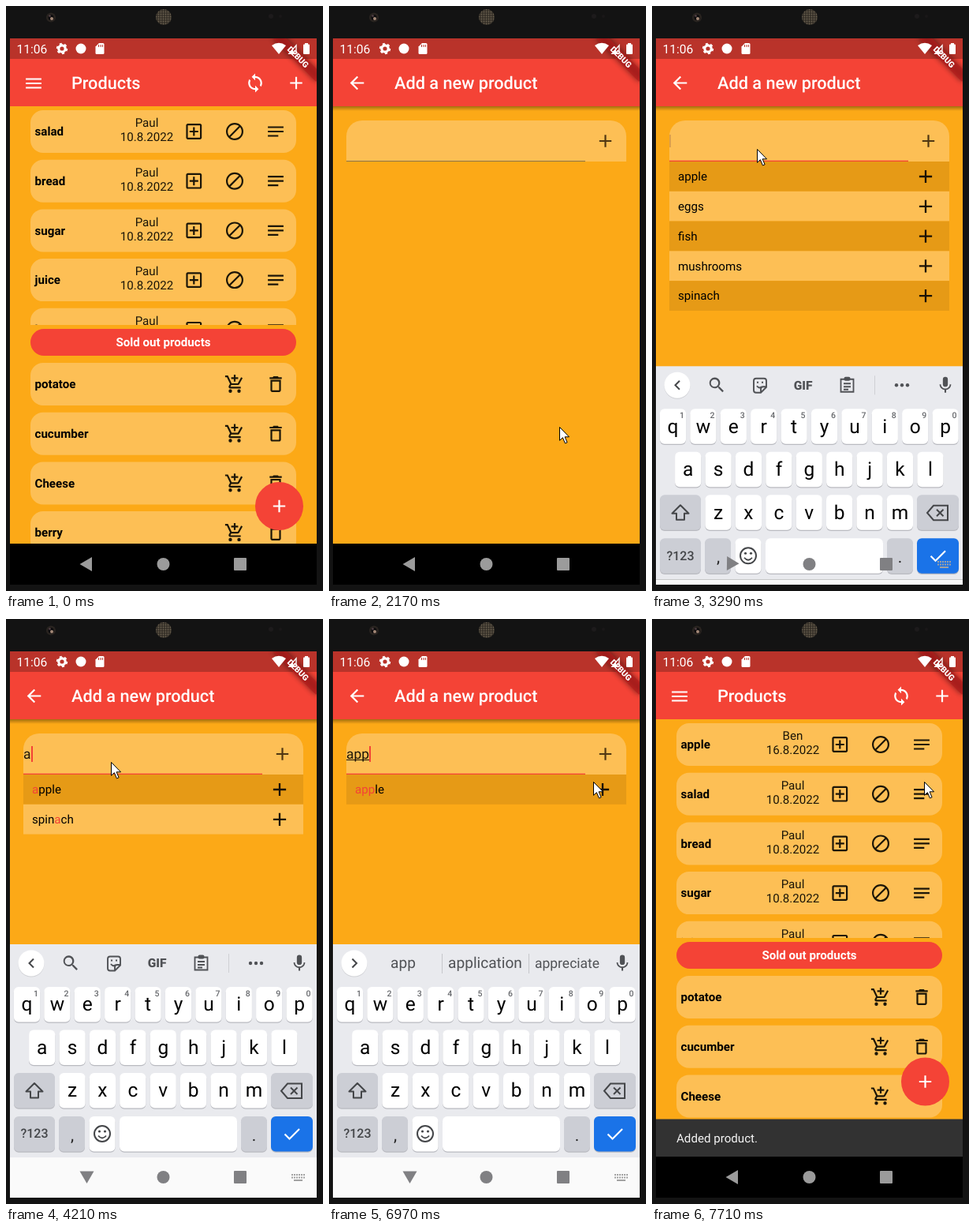
These frames come from a looping animation (402 px wide and 741 px high, 8000 ms). An HTML page:

```html
<!DOCTYPE html>
<html lang="en">
<head>
<meta charset="utf-8">
<title>Shopping list demo</title>
<style>
  html, body { margin: 0; width: 100%; height: 100%; overflow: hidden; background: #131313; }
  svg { display: block; width: 100vw; height: 100vh; }
  text { font-family: Roboto, "Liberation Sans", sans-serif; text-rendering: geometricPrecision; white-space: pre; }
</style>
</head>
<body>
<svg id="stage" viewBox="0 0 402 741"></svg>
<script>
const RED = '#f44336', ORANGE = '#fca917', CARD = '#fdbf55', INK = '#1c1608';
const LOOP = 8000, PITCH = 62.7, KBD = 321;

const ICONS = {
  add: 'M19 13h-6v6h-2v-6H5v-2h6V5h2v6h6v2z',
  menu: 'M3 18h18v-2H3zm0-5h18v-2H3zm0-7v2h18V6z',
  back: 'M20 11H7.83l5.59-5.59L12 4l-8 8 8 8 1.41-1.41L7.83 13H20z',
  sync: 'M12 4V1L8 5l4 4V6c3.31 0 6 2.69 6 6 0 1.01-.25 1.97-.7 2.8l1.46 1.46C19.54 15.03 20 13.57 20 12c0-4.42-3.58-8-8-8zm0 14c-3.31 0-6-2.69-6-6 0-1.01.25-1.97.7-2.8L5.24 7.74C4.46 8.97 4 10.43 4 12c0 4.42 3.58 8 8 8v3l4-4-4-4z',
  box: 'M19 3H5c-1.1 0-2 .9-2 2v14c0 1.1.9 2 2 2h14c1.1 0 2-.9 2-2V5c0-1.1-.9-2-2-2zm0 16H5V5h14zm-8-2h2v-4h4v-2h-4V7h-2v4H7v2h4z',
  block: 'M12 2a10 10 0 1 0 0 20 10 10 0 0 0 0-20zM4 12c0-4.42 3.58-8 8-8 1.85 0 3.55.63 4.9 1.69L5.69 16.9C4.63 15.55 4 13.85 4 12zm8 8c-1.85 0-3.55-.63-4.9-1.69L18.31 7.1C19.37 8.45 20 10.15 20 12c0 4.42-3.58 8-8 8z',
  notes: 'M3 18h12v-2H3zM3 6v2h18V6zm0 7h18v-2H3z',
  cart: 'M11 9h2V6h3V4h-3V1h-2v3H8v2h3zm-4 9a2 2 0 1 0 0 4 2 2 0 0 0 0-4zm10 0a2 2 0 1 0 0 4 2 2 0 0 0 0-4zm-9.83-3.25l.03-.12.9-1.63h7.45c.75 0 1.41-.41 1.75-1.03l3.86-7.01L19.42 4h-.01l-3.86 7H8.53L4.27 2H1v2h2l3.6 7.59-1.35 2.45C4.52 15.37 5.48 17 7 17h12v-2H7.42c-.13 0-.25-.11-.25-.25z',
  trash: 'M6 19c0 1.1.9 2 2 2h8c1.1 0 2-.9 2-2V7H6zM8 9h8v10H8zm7.5-5l-1-1h-5l-1 1H5v2h14V4z',
  search: 'M15.5 14h-.79l-.28-.27A6.5 6.5 0 1 0 13.7 14.4l.3.3v.8l5 5 1.5-1.5zm-6 0a4.5 4.5 0 1 1 0-9 4.5 4.5 0 0 1 0 9z',
  mic: 'M12 14a3 3 0 0 0 3-3V5a3 3 0 0 0-6 0v6a3 3 0 0 0 3 3zm5.3-3c0 3-2.54 5.1-5.3 5.1S6.7 14 6.7 11H5c0 3.41 2.72 6.23 6 6.72V21h2v-3.28c3.28-.48 6-3.3 6-6.72z'
};

const icon = (name, x, y, fill = INK, k = 1.1) =>
  `<path d="${ICONS[name]}" fill="${fill}" transform="translate(${x} ${y}) scale(${k}) translate(-12 -12)"/>`;
const rect = (x, y, w, h, fill, r = 0, more = '') =>
  `<rect x="${x}" y="${y}" width="${w}" height="${h}" rx="${r}" fill="${fill}" ${more}/>`;
const circle = (x, y, r, fill, more = '') => `<circle cx="${x}" cy="${y}" r="${r}" fill="${fill}" ${more}/>`;
const line = (d, color, w = 2, more = '') => `<path d="${d}" fill="none" stroke="${color}" stroke-width="${w}" ${more}/>`;
// cy is the middle of the text line
const label = (s, x, cy, { size = 15.14, fill = '#000', weight = 400, at = 'start' } = {}) =>
  `<text x="${x}" y="${cy + size * 0.34}" font-size="${size}" font-weight="${weight}" fill="${fill}" text-anchor="${at}">${s}</text>`;
const group = (id, body, more = '') => `<g id="${id}" ${more}>${body}</g>`;
const clip = (id, x, y, w, h) => `<clipPath id="${id}">${rect(x, y, w, h, '#000')}</clipPath>`;

const bar = title =>
  rect(5, 41, 389, 640, ORANGE) + rect(5, 41, 389, 27, '#b9332a') + rect(5, 67, 389, 60, RED) +
  label(title, 83, 98, { size: 21.7, weight: 500, fill: '#fff' });

const card = (name, y) => rect(31, y, 337, 54, CARD, 16) + label(name, 36.5, y + 27, { weight: 700 });

function stockCard(name, i, who = 'Paul', date = '10.8.2022') {
  const y = 132 + PITCH * i, c = y + 27, mid = { at: 'middle', fill: INK };
  return card(name, y) + label(who, 178.5, c - 11, mid) + label(date, 178.5, c + 7, mid) +
    icon('box', 238.3, c) + icon('block', 290, c) + icon('notes', 342, c);
}

function soldCard(name, i) {
  const y = 452 + PITCH * i;
  return card(name, y) + icon('cart', 290, y + 27) + icon('trash', 342, y + 27);
}

function home() {
  const stock = stockCard('apple', -1, 'Ben', '16.8.2022') +
    ['salad', 'bread', 'sugar', 'juice', 'lemon'].map((n, i) => stockCard(n, i)).join('');
  return bar('Products') + icon('menu', 35, 98, '#fff') + icon('sync', 316, 97.5, '#fff') + icon('add', 368, 97.5, '#fff') +
    `<g clip-path="url(#listClip)">${group('list', stock)}</g>` +
    rect(31, 409, 337, 34, RED, 17) +
    label('Sold out products', 199.5, 426, { weight: 700, fill: '#fff', at: 'middle' }) +
    ['potatoe', 'cucumber', 'Cheese', 'berry'].map(soldCard).join('') +
    group('snack', rect(5, 633.5, 389, 48, '#323232') + label('Added product.', 31, 657.5, { fill: '#f5f5f5' })) +
    group('fab', circle(346.5, 636, 30.5, '#000', 'id="fabShade" filter="url(#blur)"') +
      circle(346.5, 633.5, 30.5, RED, 'id="fabDisc"') + icon('add', 346.5, 633.5, '#fff'));
}

function addPage() {
  return bar('Add a new product') + icon('back', 35.5, 97.5, '#fff') +
    rect(5, 127, 389, 6, 'url(#shade)') +
    `<path d="M22 197V165a20 20 0 0 1 20-20H357a20 20 0 0 1 20 20V197z" fill="${CARD}"/>` +
    icon('add', 350.5, 171, '#4f3612') +
    rect(22, 196, 303, 1, '#8a744a', 0, 'id="rule"') +
    group('typed', '') + rect(22, 161, 2, 20, RED, 0, 'id="caret"') + group('hints', '');
}

function hintRows(words, part) {
  return words.map((w, i) => {
    const y = 197 + 37.8 * i, at = part ? w.indexOf(part) : 0;
    const s = w.slice(0, at) + `<tspan fill="${RED}">${part}</tspan>` + w.slice(at + part.length);
    return rect(22, y, 355, 37.8, i % 2 ? CARD : '#e69a16') + label(s, 33, y + 19) + icon('add', 347, y + 19, '#1b1206', 1.16);
  }).join('');
}

function keyboard() {
  const GREY = '#ccced5', DARK = '#444649';
  const key = (x, y, w, fill = '#fff', h = 44.5) => rect(x, y + 1.3, w, h, '#b9bac0', 6) + rect(x, y, w, h, fill, 6);
  const row = (chars, x0, y, nums) => [...chars].map((c, i) => {
    const x = x0 + 38.4 * i;
    return key(x - 16.6, y, 33.2) + label(c, x, y + 22, { size: 24.5, at: 'middle' }) +
      (nums ? label((i + 1) % 10, x + 11.5, y + 8, { size: 10.5, weight: 500, fill: '#66686c', at: 'middle' }) : '');
  }).join('');
  const tools =
    icon('search', 82, 436, '#505256', 1.05) +
    line('M132 427.5h10a3 3 0 0 1 3 3v8l-7 7h-6a3 3 0 0 1-3-3v-12a3 3 0 0 1 3-3zM145 438h-4a3 3 0 0 0-3 3v4M133 437q3 4 6 1M133 432.5h2M139 432.5h2', '#505256', 1.9) +
    label('GIF', 191.5, 436, { size: 15.5, weight: 900, fill: '#505256', at: 'middle' }) +
    line('M239.5 428.5h16v16h-16zM243 434h9M243 438h9M243 441.5h6', '#505256', 1.8) + rect(243.5, 425.5, 8, 5, '#505256', 2) +
    rect(282, 424, 1, 24, '#cfd0d4') +
    [310, 317, 324].map(x => circle(x, 436, 2.2, '#505256')).join('') +
    line('M35 430.5l-5.5 5.5 5.5 5.5', DARK);
  const word = (s, x, size) => label(s, x, 436, { size, fill: '#505256', at: 'middle' });
  const words = word('app', 94, 19.1) + word('application', 198, 19.1) + word('appreciate', 302, 17.5) +
    rect(143, 424, 1, 25, '#c6c7cb') + rect(253, 424, 1, 25, '#c6c7cb') + line('M29.5 430.5l5.5 5.5-5.5 5.5', DARK);
  return rect(5, 412, 389, 270, '#e9eaee') + rect(5, 682, 389, 51, '#fafafa') +
    circle(32, 437, 16.5, '#cfd0d4') + circle(32, 436, 16.5, '#fff') +
    group('tools', tools) + group('words', words) + icon('mic', 372, 436, '#505256', 1.05) +
    row('qwertyuiop', 26.5, 466, true) + row('asdfghjkl', 45.7, 520.5) + row('zxcvbnm', 84, 575) +
    key(10, 575, 52, GREY) + line('M36 588l-10.5 10.5h5.5v8h10v-8h5.5z', DARK, 2, 'stroke-linejoin="round"') +
    key(336, 575, 53, GREY) + line('M357 588.5h18v18.5h-18l-8-9.25zM361 593.5l8.5 8.5M369.5 593.5l-8.5 8.5', DARK) +
    key(10, 630, 52, GREY) + label('?123', 36, 652, { size: 16, weight: 500, fill: DARK, at: 'middle' }) +
    key(67, 630, 33, GREY) + label(',', 84, 654, { size: 21, fill: '#222', at: 'middle' }) +
    key(105.5, 630, 33) + circle(122, 652, 10, 'none', `stroke="${DARK}" stroke-width="2"`) +
    circle(118.5, 649, 1.6, DARK) + circle(125.5, 649, 1.6, DARK) + line('M117 654.5q5 6 10 0', DARK, 1.8) +
    key(144, 630, 149) + key(298, 630, 33, GREY) + label('.', 314.5, 654, { size: 21, fill: '#222', at: 'middle' }) +
    key(336, 630, 53, '#1a73e8') + line('M353.5 652.5l6 6 12.5-12.5', '#fff', 2.2);
}

function statusIcons() {
  const W = '#fff';
  return label('11:06', 13.5, 54.5, { size: 15.6, fill: W }) +
    circle(71, 54, 4.2, 'none', `stroke="${W}" stroke-width="3.2"`) +
    circle(71, 54, 6.2, 'none', `stroke="${W}" stroke-width="2" pathLength="12" stroke-dasharray="1 1"`) +
    circle(95, 54, 6.5, W) +
    `<path d="M118 47h5a1.5 1.5 0 0 1 1.5 1.5v11a1.5 1.5 0 0 1-1.5 1.5h-8a1.5 1.5 0 0 1-1.5-1.5v-8z" fill="${W}"/>` +
    line('M117.5 49v3M120 49v3M122.3 49v3', '#b9332a', 1) +
    `<path d="M346 61l-9-11q9-6.5 18 0z" fill="${W}"/>` +
    line('M359 60.3l9-10.5v10.5z', W, 1.4) + `<path d="M358 61l6-7v7z" fill="${W}"/>` +
    rect(377, 48.5, 8, 12.5, W, 1) + rect(379, 47, 4, 3, W);
}

const banner =
  `<g transform="translate(394 41) rotate(45)">` +
  rect(-38, 27.5, 76, 12, '#000', 0, 'opacity=".5" filter="url(#blur)"') + rect(-38, 27.5, 76, 12, '#b71c1c', 0, 'opacity=".7"') +
  label('DEBUG', 0, 33.5, { size: 10.4, weight: 900, fill: '#fff', at: 'middle' }) + '</g>';

const bezel =
  rect(0, 0, 402, 741, '#131313') +
  circle(57, 14.5, 6, '#292420') + circle(57, 14.5, 3.5, '#0c0b0d') + circle(58, 16, 2, '#a58a78') + circle(55.5, 12.5, 1.3, '#57454a') +
  circle(200, 14, 10, '#332e26') + circle(200, 14, 10, 'url(#mesh)') +
  circle(336, 13, 3, '#1d1b1c') + circle(348, 13, 2, '#1a1819');

const $ = id => document.getElementById(id);
$('stage').innerHTML = `<defs>
  ${clip('screen', 5, 41, 389, 692)}${clip('app', 5, 41, 389, 640)}${clip('listClip', 5, 127, 389, 277)}
  <filter id="blur" x="-30%" y="-60%" width="160%" height="220%"><feGaussianBlur stdDeviation="3.5"/></filter>
  <linearGradient id="shade" x2="0" y2="1"><stop stop-opacity=".35"/><stop offset="1" stop-opacity="0"/></linearGradient>
  <pattern id="mesh" width="3" height="3" patternUnits="userSpaceOnUse">${circle(1.5, 1.5, 0.9, '#6b6151')}</pattern>
  </defs>` + bezel +
  `<g clip-path="url(#screen)">
    <g clip-path="url(#app)">${group('home', home())}${rect(5, 41, 389, 640, '#000', 0, 'id="scrim"')}${group('add', addPage())}${banner}${statusIcons()}</g>
    ${rect(5, 681, 389, 52, '#000')}${group('kbd', keyboard())}
    ${group('nav', '<path id="tri" d="M93.5 707l15.5-9v18z"/><circle cx="199.5" cy="707" r="8"/><rect x="289" y="699" width="16" height="16" rx="1"/>')}
    ${group('switcher', line('M362 704h17M362 707.5h17', '#a2a2a2', 2, 'stroke-dasharray="2 1"') + line('M365 711h11', '#a2a2a2', 2))}
  </g>` +
  group('mouse', '<path d="M.5 .5v16.8l3.9-3.6 3 7.2 2.7-1.1-3-7h5.4z" fill="#fff" stroke="#000" stroke-linejoin="round"/>');

// Moments where a run of screen updates begins; inside a run the picture steps every 70 ms
const RUNS = [0, 990, 1610, 2450, 3290, 4080, 4210, 4410, 4610, 5140, 5340, 6150, 6480, 7300, 7710];
const TRACK = [
  [990, 356, 730], [1410, 352, 635], [2030, 352, 635], [2170, 292, 533], [2450, 205, 345], [2730, 143, 202], [2870, 133, 181],
  [5300, 133, 181], [5750, 115, 210], [6440, 115, 210], [6620, 165, 213], [6830, 285, 211], [6970, 335, 206], [7110, 345, 206]
];
const TYPING = [[4210, 'a', 32], [4410, 'ap', 42], [4610, 'app', 51]];
const BLINKS = [[3080, 3580], [4080, 5140], [5640, 6150], [6650, 7150]];
const WORDS = ['apple', 'eggs', 'fish', 'mushrooms', 'spinach'];

function ramp(t, a, b) {
  const p = (t - a) / (b - a);
  return p < 0 ? 0 : p > 1 ? 1 : p;
}
const out = (p, n = 3) => 1 - (1 - p) ** n;
const show = (id, on) => $(id).setAttribute('display', on ? 'inline' : 'none');
const move = (id, x, y) => $(id).setAttribute('transform', `translate(${x} ${y})`);
const zoom = (id, k) => $(id).setAttribute('transform', `translate(199.5 361) scale(${k}) translate(-199.5 -361)`);
const set = (id, attrs) => { for (const k in attrs) $(id).setAttribute(k, attrs[k]); };

function step(t) {
  const start = RUNS.filter(r => r <= t).pop();
  return start + Math.floor((t - start) / 70) * 70;
}

function mouseAt(t) {
  const i = TRACK.findIndex(p => p[0] > t);
  if (i < 0) return TRACK[TRACK.length - 1].slice(1);
  const [a, x, y] = TRACK[i - 1], [b, u, v] = TRACK[i], p = ramp(t, a, b);
  return [x + (u - x) * p, y + (v - y) * p];
}

let lastHints = null;
function drawForm(t) {
  const [, text, x] = TYPING.filter(k => k[0] <= t).pop() || [0, '', 22];
  const focus = t >= 3010, state = focus + text;
  if (state !== lastHints) {
    lastHints = state;
    $('hints').innerHTML = focus ? hintRows(WORDS.filter(w => w.includes(text)), text) : '';
    $('typed').innerHTML = label(text, 22, 171, { size: 17.4, fill: INK }) +
      (text.length > 1 ? rect(22, 178, x - 22, 1, INK) : '');
    set('rule', { fill: focus ? RED : '#8a744a', height: focus ? 1.5 : 1, y: focus ? 195.7 : 196 });
  }
  const faint = t < 4000;
  set('caret', { x, y: faint ? 163 : 161, height: faint ? 16 : 20, fill: faint ? '#dc9f4c' : RED });
  show('caret', BLINKS.some(([a, b]) => t >= a && t < b));
}

function render(time) {
  const t = step(time);

  const press = ramp(t, 1540, 1750), push = ramp(t, 1820, 2120), pop = ramp(t, 7250, 7510), back = t >= 7250;
  set('fabDisc', { fill: !back && press > 0 ? `rgb(${244 - 9 * press},${67 + 21 * press},${54 + 23 * press})` : RED });
  set('fabShade', { opacity: back ? 0 : 0.45 * press });

  zoom('home', back ? 1 : 1 + 0.05 * out(push));
  set('scrim', { opacity: back ? 0 : 0.6 * ramp(push, 0.2, 0.42) });
  zoom('add', 0.85 + 0.15 * out(push));
  set('add', { opacity: ramp(push, 0.1, 0.4) * (1 - pop) });
  show('add', push > 0 && pop < 1);
  drawForm(t);

  const snack = out(ramp(t, 7300, 7650));
  move('list', 0, back ? PITCH : 0);
  move('snack', 0, 48 * (1 - snack));
  move('fab', 0, -47.5 * snack);
  show('snack', snack > 0);

  const rise = ramp(t, 3145, 3445), fall = ramp(t, 7250, 7580);
  const hidden = back ? fall ** 1.5 : 1 - out(rise);
  move('kbd', 0, KBD * hidden);
  show('kbd', hidden < 1);
  show('tools', t < 4480);
  show('words', t >= 4480);
  show('switcher', hidden < 0.2);
  set('nav', { fill: hidden < 0.85 ? '#808083' : '#9b9b9b' });
  const turn = 270 * (back ? 1 - fall : out(rise, 1.68));
  set('tri', { transform: `rotate(${turn} 102 706.5)` });

  show('mouse', t >= 990);
  if (t >= 990) move('mouse', ...mouseAt(t));
}

let begin = null;
function tick(now) {
  begin ??= now;
  render((now - begin) % LOOP);
  requestAnimationFrame(tick);
}
render(0);
requestAnimationFrame(tick);
</script>
</body>
</html>
```
